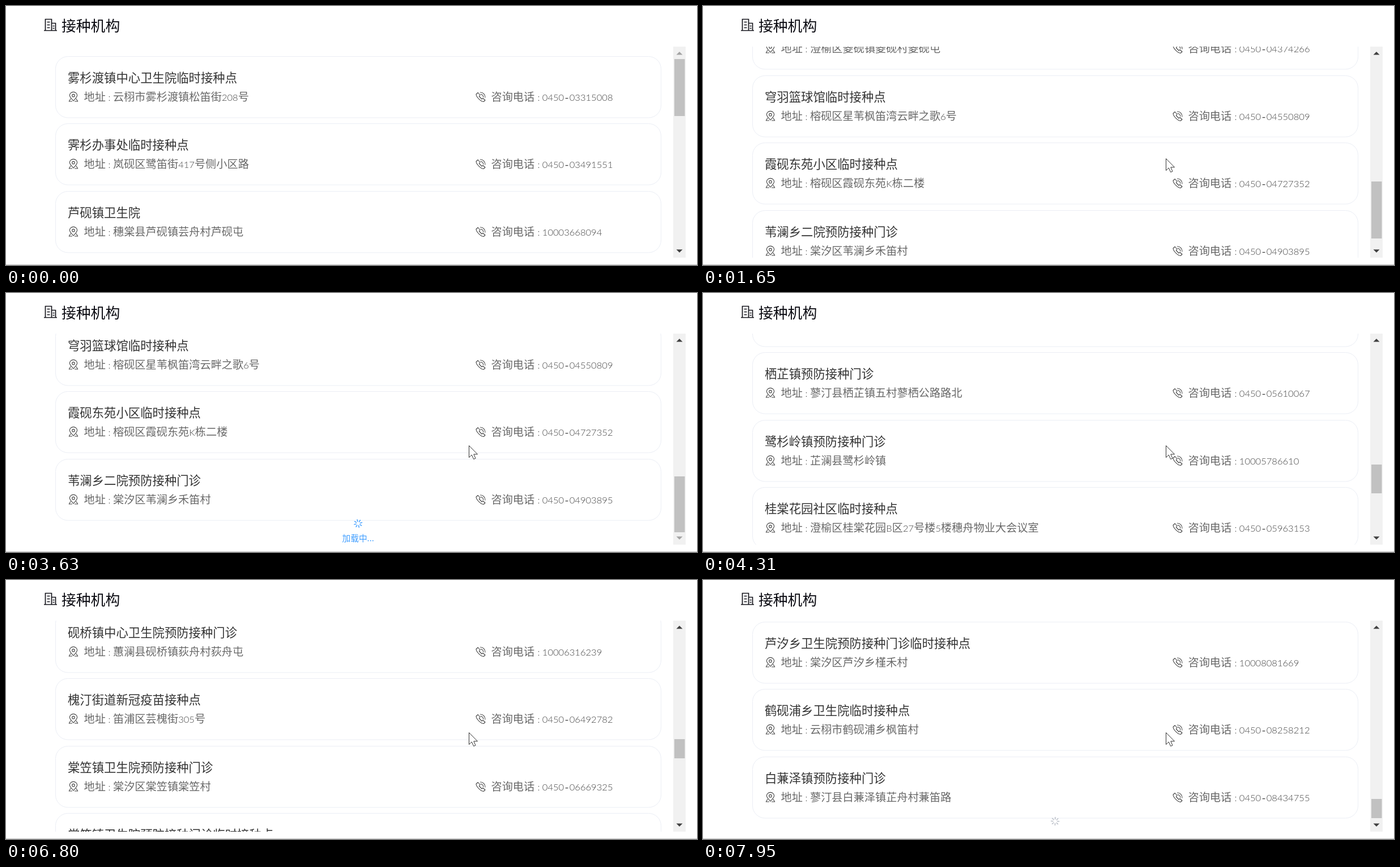
An HTML page that plays this animation: 1220 by 459 pixels, repeating every 8 s.

```html
<!DOCTYPE html>
<html lang="zh-CN">
<head>
<meta charset="utf-8">
<style>
  html, body { margin: 0; width: 100%; height: 100%; overflow: hidden; background: #fff; }
  svg { display: block; }
  text { font-family: "Noto Sans CJK SC", "Noto Sans CJK", sans-serif; white-space: pre; }
  .heading { font-size: 25.8px; fill: #0b0b12; }
  .title { font-size: 21.36px; fill: #333; }
  .info { font-size: 19.2px; font-weight: 300; fill: #686868; }
  .num { font-family: Lato, sans-serif; font-size: 16.55px; font-weight: 300; fill: #444; }
  .dash { font-family: "Noto Sans Mono", monospace; font-size: 16px; }
  .card { fill: #fff; stroke: #ebeef5; }
  .line { fill: none; stroke: #444; stroke-width: 1.1; stroke-linejoin: round; stroke-linecap: round; }
  .building { fill: none; stroke: #15151c; stroke-width: 1.7; }
  .loading-text { font-size: 14.7px; text-anchor: middle; stroke: none; }
</style>
</head>
<body>
<svg id="stage" width="1220" height="459" viewBox="0 0 1220 459">
  <defs>
    <clipPath id="view"><rect y="72" width="1220" height="374"/></clipPath>
    <g id="pin" class="line">
      <path d="M9 16C5 11.8 2.4 9.4 2.4 6.6a6.6 6.2 0 0 1 13.2 0C15.6 9.4 13 11.8 9 16Z"/>
      <circle cx="9" cy="6.7" r="2.3"/>
      <path d="M4 12.5L1.3 17H6.5M14 12.5L16.7 17H11.5"/>
    </g>
    <g id="phone" class="line">
      <path d="M1 4.5L4.3 1.5L8 6L6.3 8L11 13L13 11.5L17 15L14.3 17.5C10 17.5 1.5 10 1 4.5Z"/>
      <path d="M8.5 1C13.5 1 17 5 17 10M9 4.5C12 4.8 13.7 7 13.7 9.5"/>
    </g>
  </defs>

  <g class="building">
    <path d="M67 43.5H90M69.5 43V23.5H80.5V43M80.5 30.5H87.5V43"/>
    <path d="M72.5 28.5H77.5M72.5 33.5H77.5M72.5 38.5H77.5M82.5 35.5H85.5M82.5 39.5H85.5" stroke-width="1.3"/>
  </g>
  <text class="heading" x="98" y="44.5">接种机构</text>

  <g clip-path="url(#view)">
    <g id="list">
      <g id="loader">
        <g id="rays" stroke-width="1.5" stroke-linecap="round"></g>
        <text class="loading-text" y="31">加载中...</text>
      </g>
    </g>
  </g>

  <rect x="1178" y="72" width="22" height="374" fill="#f1f1f1"/>
  <rect id="thumb" x="1180" width="18.5" fill="#c1c1c1"/>
  <path id="up" d="M1183.5 86.5L1189 81L1194.5 86.5Z"/>
  <path id="down" d="M1183.5 431.5L1189 437L1194.5 431.5Z"/>
  <path d="M0 458.5H1220" stroke="#c2c2c2"/>
  <path id="cursor" d="M.5 .5V21.5L5.3 17L8.7 24.5L12 23L8.8 15.8H15.5Z" fill="#fff" stroke="#333"/>
</svg>

<script>
const LOOP = 8000, PITCH = 119.4, FIRST_TOP = 89.5, VIEW = 373.5, TRACK = 329.5;
const PAGE = 10, LOADER_SPACE = 22.5;
const $ = id => document.getElementById(id);

// Plain town names get a standard title and address.
const places = [
  '雾杉渡镇中心卫生院临时接种点|云栩市雾杉渡镇松笛街208号',
  '霁杉办事处临时接种点|岚砚区鹭笛街417号侧小区路',
  '芦砚镇卫生院|穗棠县芦砚镇芸舟村芦砚屯|m',
  '蒲笙', '荷笠', '桐笙', '菱砚',
  '穹羽篮球馆临时接种点|榕砚区星苇枫笛湾云畔之歌6号',
  '霞砚东苑小区临时接种点|榕砚区霞砚东苑K栋二楼',
  '苇澜乡二院预防接种门诊|棠汐区苇澜乡禾笛村',
  '芸笠', '杉笙', '槿砚',
  '栖芷镇预防接种门诊|蓼汀县栖芷镇五村蓼栖公路路北',
  '鹭杉岭镇预防接种门诊|芷澜县鹭杉岭镇|m',
  '桂棠花园社区临时接种点|澄榆区桂棠花园B区27号楼5楼穗舟物业大会议室',
  '蕙笠',
  '砚桥镇中心卫生院预防接种门诊|蕙澜县砚桥镇荻舟村荻舟屯|m',
  '槐汀街道新冠疫苗接种点|笛浦区芸槐街305号',
  '棠笠镇卫生院预防接种门诊|棠汐区棠笠镇棠笠村',
  '棠笠镇卫生院预防接种门诊临时接种点|棠汐区棠笠镇棠笠村',
  '榆笙', '荻笠', '枫砚', '苇笙', '蓼笠', '柚砚',
  '芦汐乡卫生院预防接种门诊临时接种点|棠汐区芦汐乡槿禾村|m',
  '鹤砚浦乡卫生院临时接种点|云栩市鹤砚浦乡枫笛村',
  '白蒹泽镇预防接种门诊|蓼汀县白蒹泽镇芷舟村蒹笛路'
];

function phoneNumber(i, mobile) {
  const digits = String(3315008 + i * 176543).slice(-7);
  return mobile ? '1000' + digits : '0450-0' + digits;
}

const styled = s => s
  .replace(/[0-9A-Z:]+/g, '<tspan class="num">$&</tspan>')
  .replace(/-(?=<)/, '<tspan class="num dash">-</tspan>');
const info = (x, s) => `<text class="info" x="${x}" y="78.5">${styled(s)}</text>`;

function card(place, i) {
  const row = place.includes('|') ? place
    : `${place}镇卫生院|澄榆区${place}镇${place}村${place}屯`;
  const [title, address, mobile] = row.split('|');
  return `<g transform="translate(0 ${FIRST_TOP + Math.round(i * PITCH)})">
    <rect class="card" x="87.5" width="1069" height="108.5" rx="22"/>
    <text class="title" x="109" y="45.5">${title}</text>
    <use href="#pin" x="110" y="62.5"/><use href="#phone" x="829" y="62.5"/>
    ${info(137.5, '地址')}${info(180.5, ':')}${info(189, address)}
    ${info(856.5, '咨询电话')}${info(938.5, ':')}${info(946.8, phoneNumber(i, mobile))}</g>`;
}

const cards = places.map(card);
const pages = [0, 1, 2].map(p => {
  const g = document.createElementNS('http://www.w3.org/2000/svg', 'g');
  g.innerHTML = cards.slice(p * PAGE, (p + 1) * PAGE).join('');
  $('list').insertBefore(g, $('loader'));
  return g;
});
$('rays').innerHTML = Array.from({ length: 8 }, (_, i) =>
  `<path d="M0 -3.7V-7" transform="rotate(${i * 45})"/>`).join('');

// Bursts of picture updates: start, end, count.
const bursts = [
  [270, 600, 6], [920, 1380, 8], [1650, 2440, 13], [2510, 3300, 13], [3370, 3850, 8],
  [4110, 4310, 4], [4580, 5380, 13], [5460, 6250, 13], [6350, 6800, 8],
  [7080, 7350, 5], [7550, 7950, 7]
];
// Time and scroll offset.
const scrollKeys = [
  [0, 0], [860, 0], [1380, 777], [1590, 777], [1650, 802], [1840, 847.5], [1910, 847.5],
  [2110, 870], [4050, 870], [4310, 1536], [4520, 1536], [4900, 2041.5], [5060, 2041.5],
  [5240, 2064], [7020, 2064], [7350, 2841], [7490, 2841], [7880, 3235.5], [7940, 3235.5],
  [7950, 3239], [LOOP, 3239]
];
// The loader keeps its place below the list until the next scroll.
const loads = [[1900, 4100], [4980, 7070], [7940, LOOP]];

function lastUpdate(t) {
  const burst = bursts.filter(b => b[0] <= t).pop();
  if (!burst) return 0;
  const [start, end, count] = burst;
  const step = (end - start) / (count - 1);
  const k = Math.min(count - 1, Math.floor((t - start) / step + 1e-6));
  return Math.round(start + k * step);
}

function scrollAt(t) {
  const i = scrollKeys.findIndex(k => k[0] > t);
  const [t0, s0] = scrollKeys[i - 1], [t1, s1] = scrollKeys[i];
  return Math.round(s0 + (s1 - s0) * (1 - Math.cos(Math.PI * (t - t0) / (t1 - t0))) / 2);
}

function drawLoader(t, load, y) {
  $('loader').style.display = load ? '' : 'none';
  if (!load) return;
  const age = t - load[0];
  const color = age < 40 ? '#b9bec6' : age < 120 ? '#9fc6ee' : '#409eff';
  $('loader').setAttribute('fill', color);
  $('loader').setAttribute('stroke', color);
  $('loader').setAttribute('transform', `translate(621.7 ${y})`);
  $('rays').setAttribute('transform', `rotate(${age * 0.18})`);
}

function drawScrollbar(scroll, max) {
  const height = Math.round(TRACK * VIEW / (VIEW + max));
  $('thumb').setAttribute('height', height);
  $('thumb').setAttribute('y', Math.round(94.3 + Math.min(1, scroll / max) * (TRACK - height)));
  $('up').setAttribute('fill', scroll < 1 ? '#a3a3a3' : '#404040');
  $('down').setAttribute('fill', scroll > max - 1 ? '#a3a3a3' : '#404040');
}

function drawCursor(t) {
  $('cursor').style.display = t < 270 ? 'none' : '';
  const left = (1 - Math.min(1, Math.max(0, (t - 270) / 330))) ** 2;
  $('cursor').setAttribute('transform', `translate(${817 + 370 * left} ${270 + 170 * left})`);
}

function draw(time) {
  const t = lastUpdate(time);
  const pageCount = t < 3850 ? 1 : t < 6800 ? 2 : 3;
  const load = loads.find(([from, to]) => t >= from && t < to);
  const end = 847.5 + (pageCount - 1) * PAGE * PITCH;
  const scroll = scrollAt(t);

  pages.forEach((g, p) => g.style.display = p < pageCount ? '' : 'none');
  $('list').setAttribute('transform', `translate(0 ${-scroll})`);
  drawLoader(t, load, 408.5 + end + LOADER_SPACE);
  drawScrollbar(scroll, end + (load ? LOADER_SPACE : 0));
  drawCursor(t);
}

const startTime = performance.now();
function tick() {
  draw((performance.now() - startTime) % LOOP);
  requestAnimationFrame(tick);
}
tick();
</script>
</body>
</html>
```
